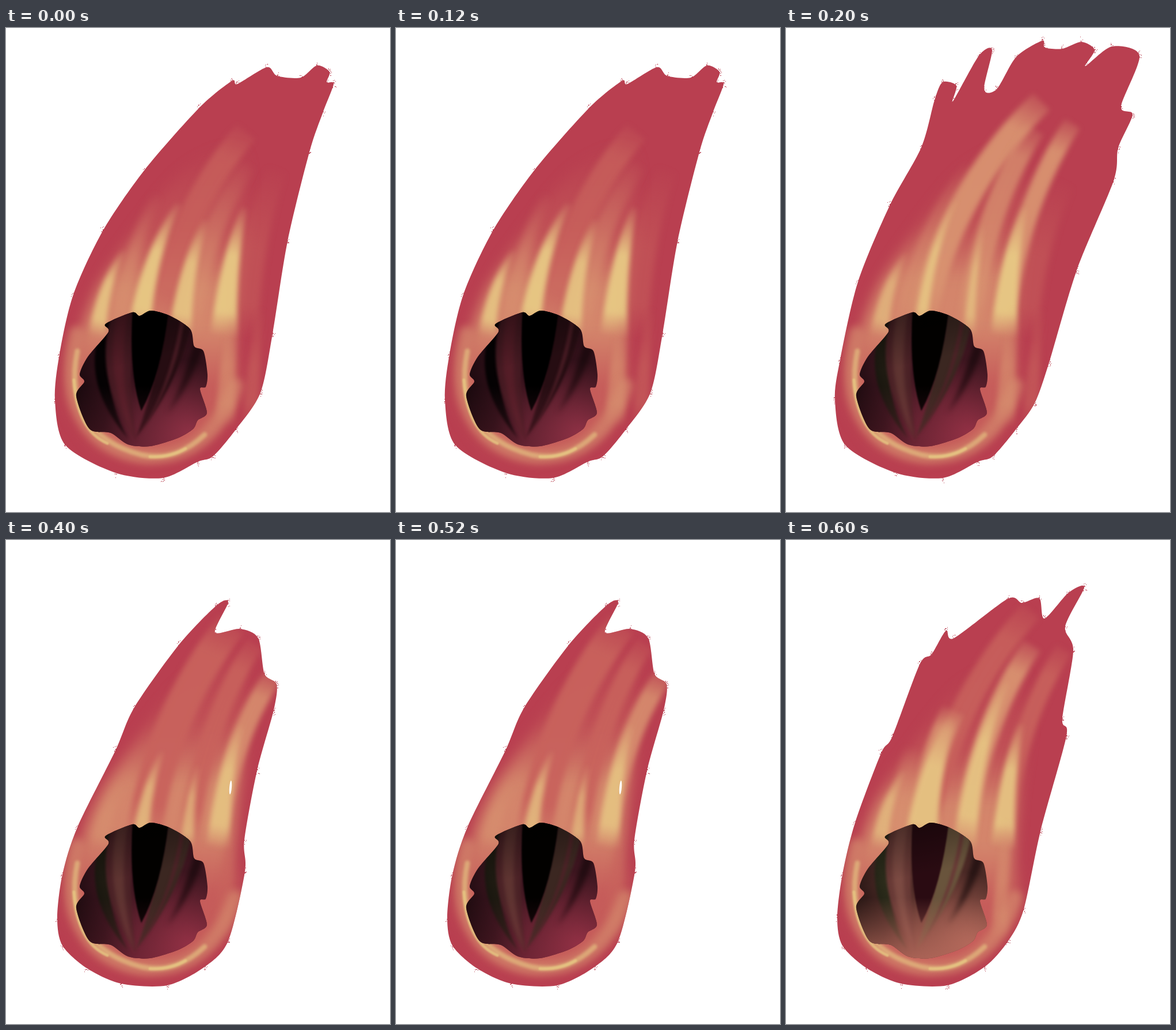
An HTML page with a canvas that plays this animation: 667x839 px, repeating every 0.8 s.

```html
<!DOCTYPE html>
<html lang="en">
<head>
<meta charset="utf-8">
<title>Meteor</title>
<style>
html, body { margin: 0; width: 100%; height: 100%; overflow: hidden; background: #fff; }
canvas { display: block; }
</style>
</head>
<body>
<canvas id="stage" width="667" height="839"></canvas>
<script>
const W = 667, H = 839, STEP = 200;
const RED = '#b93f50', ROSE = '#c8625c', SALMON = '#d89270', GOLD = '#e7c884';
let g;

// Hex colour with an alpha from 0 to 1
const tint = (c, a) => c + Math.round(a * 255).toString(16).padStart(2, '0');

const WIDE = [400,695, 360,742, 333,752, 272,780, 190,771, 103,723, 85,645];
const SLIM = [386,695, 345,740, 280,772, 200,769, 140,742, 98,703, 89,655];

const ROCK = [219,493, 232,499, 252,490, 285,499, 320,522, 327,552, 343,560, 350,600, 347,622,
  337,626, 349,667, 333,680, 325,695, 298,711, 250,725, 212,722, 182,702, 145,695, 122,638,
  136,613, 128,600, 142,570, 178,527, 173,513];

// Closed smooth path through points
function smooth(p, k = 0.14) {
  const n = p.length / 2, path = new Path2D();
  const at = i => { const j = (i + n) % n * 2; return [p[j], p[j + 1]]; };
  path.moveTo(p[0], p[1]);
  for (let i = 0; i < n; i++) {
    const [a, b, c, d] = [at(i - 1), at(i), at(i + 1), at(i + 2)];
    path.bezierCurveTo(b[0] + (c[0] - a[0]) * k, b[1] + (c[1] - a[1]) * k,
      c[0] - (d[0] - b[0]) * k, c[1] - (d[1] - b[1]) * k, c[0], c[1]);
  }
  path.closePath();
  return path;
}

function soft(blur, draw) {
  g.save();
  g.filter = `blur(${blur}px)`;
  draw();
  g.restore();
}

// Tapered mark rising from the rock to a tip, bending towards the tail
function streak(x0, x1, y1, w, col, alpha, hold, taper, blur, y0 = 535) {
  const cx = x0 + (x1 - x0) * 0.2, cy = y0 + (y1 - y0) * 0.6;
  const left = [], right = [];
  for (let t = 0; t <= 1; t += 0.05) {
    const u = 1 - t;
    const x = u * u * x0 + 2 * u * t * cx + t * t * x1;
    const y = u * u * y0 + 2 * u * t * cy + t * t * y1;
    const dx = u * (cx - x0) + t * (x1 - cx), dy = u * (cy - y0) + t * (y1 - cy);
    const r = w * (1 - taper * t) / 2 / Math.hypot(dx, dy);
    left.push([x - dy * r, y + dx * r]);
    right.unshift([x + dy * r, y - dx * r]);
  }
  const fade = g.createLinearGradient(x0, y0, x1, y1);
  fade.addColorStop(0, tint(col, 0));
  fade.addColorStop(0.18, tint(col, alpha));
  fade.addColorStop(hold, tint(col, alpha));
  fade.addColorStop(1, tint(col, 0));
  soft(blur, () => {
    g.fillStyle = fade;
    g.beginPath();
    left.concat(right).forEach(q => g.lineTo(...q));
    g.fill();
  });
}
const band = (x0, x1, y1, w, col, a = 0.9) => streak(x0, x1, y1, w, col, a, 0.82, 0.15, 5);
const veil = (x0, x1, y1, w, col, a = 0.5) => streak(x0, x1, y1, w, col, a, 0.5, 0.4, 6);
const lick = (x0, x1, y1, w, a = 0.85) => streak(x0, x1, y1, w, GOLD, a, 0.6, 0.8, 4);
const flank = (x, w, col) => streak(x, x + 20, 480, w, col, 0.6, 0.5, 0.6, 5, 690);

function glow(top) {
  const shape = smooth([106,640, 124,545, 160,450, 225,350, 310,245, 410,200, 418,330,
    402,450, 396,550, 402,640, 355,705, 245,748, 155,722]);
  const fade = g.createLinearGradient(0, 740, 0, top);
  fade.addColorStop(0, tint(ROSE, 0.85));
  fade.addColorStop(0.22, tint(ROSE, 0.85));
  fade.addColorStop(0.4, tint(SALMON, 0.85));
  fade.addColorStop(0.54, tint(SALMON, 0.85));
  fade.addColorStop(0.72, tint(ROSE, 0.5));
  fade.addColorStop(1, tint(ROSE, 0));
  soft(11, () => { g.fillStyle = fade; g.fill(shape); });
}

function rim() {
  const line = (d, w, c, a) => soft(w / 4, () => {
    g.lineWidth = w;
    g.lineCap = 'round';
    g.strokeStyle = tint(c, a);
    g.stroke(new Path2D(d));
  });
  line('M122 530C96 640 140 728 240 742C320 748 372 700 398 620', 26, SALMON, 0.6);
  line('M124 560C106 650 142 716 236 740C284 750 318 730 345 705', 9, GOLD, 0.6);
  line('M118 610C122 668 140 704 176 720M250 743Q284 745 312 729', 5, GOLD, 0.8);
}

function stone({ core, crescent, left, shine, right, base, ember, warm }) {
  const cover = style => { g.fillStyle = style; g.fillRect(115, 485, 245, 245); };
  const shade = (x0, y0, x1, y1, c, a) => {
    const fade = g.createLinearGradient(x0, y0, x1, y1);
    fade.addColorStop(0, tint(c, a));
    fade.addColorStop(1, tint(c, 0));
    cover(fade);
  };
  // Vertical sliver between two bowed edges that meet at a tip
  const sliver = (a, bowA, b, bowB, tipX, tipY, c, blur = 2) => soft(blur, () => {
    g.fillStyle = c;
    g.fill(new Path2D(`M${a} 486Q${bowA} 600 ${tipX} ${tipY}Q${bowB} 600 ${b} 486Z`));
  });

  g.save();
  g.clip(smooth(ROCK));
  cover(base);
  const heat = g.createRadialGradient(320, 705, 5, 300, 705, 130);
  heat.addColorStop(0, ember);
  heat.addColorStop(1, tint(ember, 0));
  cover(heat);

  sliver(360, 338, 340, 318, 280, 668, '#0f050899', 4);
  sliver(180, 115, 207, 150, 212, 712, crescent);
  sliver(187, 146, 222, 210, 226, 716, left);
  sliver(195, 166, 213, 192, 224, 714, shine, 3);
  sliver(282, 266, 326, 312, 226, 710, right);
  sliver(306, 292, 312, 302, 235, 702, left);
  sliver(220, 213, 283, 270, 235, 664, core, 1);

  shade(122, 650, 185, 625, '#000000', 0.6);
  shade(215, 490, 235, 580, '#000000', 0.4);
  shade(230, 725, 230, 620, ember, warm);
  g.restore();
}

// Dry brush specks along the outline
function specks(p) {
  let seed = 71;
  const rnd = () => (seed = seed * 16807 % 2147483647) / 2147483647;
  const off = r => Math.round((rnd() + rnd() - 1) * r);
  for (let i = 0; i < p.length; i += 2)
    for (let k = 0; k < 14; k++) g.fillRect(p[i] + off(4), p[i + 1] + off(9), 1, 1);
}

function pose(edge, top, rock, flames) {
  const c = document.createElement('canvas');
  c.width = W;
  c.height = H;
  g = c.getContext('2d');
  const body = smooth(edge);
  g.fillStyle = RED;
  g.fill(body);
  specks(edge);
  g.save();
  g.clip(body);
  glow(top);
  flames();
  rim();
  g.restore();
  stone(rock);
  return c;
}

const dark = { core: '#000000', crescent: '#050203', left: '#451a22', shine: '#541d27',
  right: '#260d12', base: '#32111a', ember: '#8c3044', warm: 0.3 };
const dusky = { core: '#020100', crescent: '#1f1b12', left: '#4b2226', shine: '#5e3431',
  right: '#3b2721', base: '#3e1620', ember: '#913044', warm: 0.3 };
const lit = { core: '#2a0b12', crescent: '#2c2c1b', left: '#683a36', shine: '#7b4a42',
  right: '#69543c', base: '#4c2a26', ember: '#b2685a', warm: 0.85 };

const tall = pose([93,565, 117,462, 168,352, 240,247, 335,139, 392,92, 402,97, 453,68, 471,83,
  512,86, 540,65, 562,76, 557,94, 569,97, 551,145, 527,215, 489,370, 463,530, 442,632, ...WIDE],
  200, dark, () => {
    veil(410, 475, 235, 55, ROSE);
    band(262, 430, 165, 48, ROSE, 0.75);
    veil(315, 430, 225, 44, SALMON);
    veil(195, 268, 280, 28, SALMON);
    lick(230, 306, 295, 40, 0.95);
    lick(302, 350, 325, 40);
    lick(378, 417, 303, 46, 0.95);
    lick(158, 208, 380, 30);
    flank(380, 34, SALMON);
    flank(425, 28, ROSE);
  });

const broad = pose([94,575, 125,440, 180,308, 235,207, 258,125, 272,94, 296,100, 290,127, 335,48,
  358,38, 344,106, 366,106, 400,50, 445,22, 450,34, 480,36, 513,24, 536,38, 520,66, 566,32,
  614,48, 582,136, 602,150, 577,208, 569,265, 505,420, 457,580, 432,650, ...WIDE],
  180, dusky, () => {
    veil(410, 490, 260, 55, ROSE);
    veil(205, 330, 230, 40, SALMON);
    band(230, 462, 110, 48, SALMON, 0.95);
    band(315, 442, 160, 42, SALMON, 0.75);
    band(375, 508, 150, 36, SALMON, 0.95);
    lick(232, 300, 290, 24);
    lick(318, 345, 335, 20, 0.7);
    lick(378, 417, 303, 46, 0.95);
    lick(162, 212, 385, 32, 0.6);
    flank(380, 34, SALMON);
    flank(425, 28, ROSE);
  });

const torn = pose([98,580, 124,498, 190,365, 223,290, 300,182, 365,114, 386,108, 363,160, 406,154,
  438,170, 449,232, 470,250, 465,295, 436,400, 414,520, 415,575, ...SLIM],
  150, dusky, () => {
    band(235, 405, 130, 62, ROSE, 0.95);
    band(315, 442, 165, 36, ROSE);
    band(362, 474, 220, 38, SALMON, 0.85);
    lick(232, 275, 360, 30, 0.75);
    lick(314, 335, 385, 24, 0.65);
    lick(368, 412, 312, 40, 0.8);
    veil(162, 204, 420, 30, SALMON);
    flank(375, 28, ROSE);
    // Bare gap in the paint
    g.fillStyle = '#fff';
    g.beginPath();
    g.ellipse(390, 429, 2, 12, 0.08, 0, 7);
    g.fill();
  });

const forked = pose([98,580, 120,490, 165,370, 185,340, 232,216, 253,198, 278,157, 292,170, 385,102,
  410,109, 440,101, 449,136, 490,92, 518,82, 485,150, 499,192, 480,310, 487,340, 442,505,
  413,640, ...SLIM],
  220, lit, () => {
    band(235, 442, 105, 45, ROSE, 0.85);
    band(372, 492, 175, 34, ROSE);
    veil(198, 222, 355, 46, SALMON, 0.7);
    band(228, 296, 286, 46, SALMON);
    lick(234, 292, 300, 60);
    band(306, 438, 168, 40, SALMON, 0.95);
    lick(310, 390, 235, 40);
    lick(376, 411, 310, 42, 0.9);
    lick(162, 208, 395, 30, 0.65);
    flank(370, 28, SALMON);
  });

const poses = [tall, broad, torn, forked];
const ctx = document.getElementById('stage').getContext('2d');

function tick(now) {
  ctx.fillStyle = '#fff';
  ctx.fillRect(0, 0, W, H);
  ctx.drawImage(poses[Math.floor(now / STEP) % poses.length], 0, 0);
  requestAnimationFrame(tick);
}
tick(performance.now());
</script>
</body>
</html>
```
